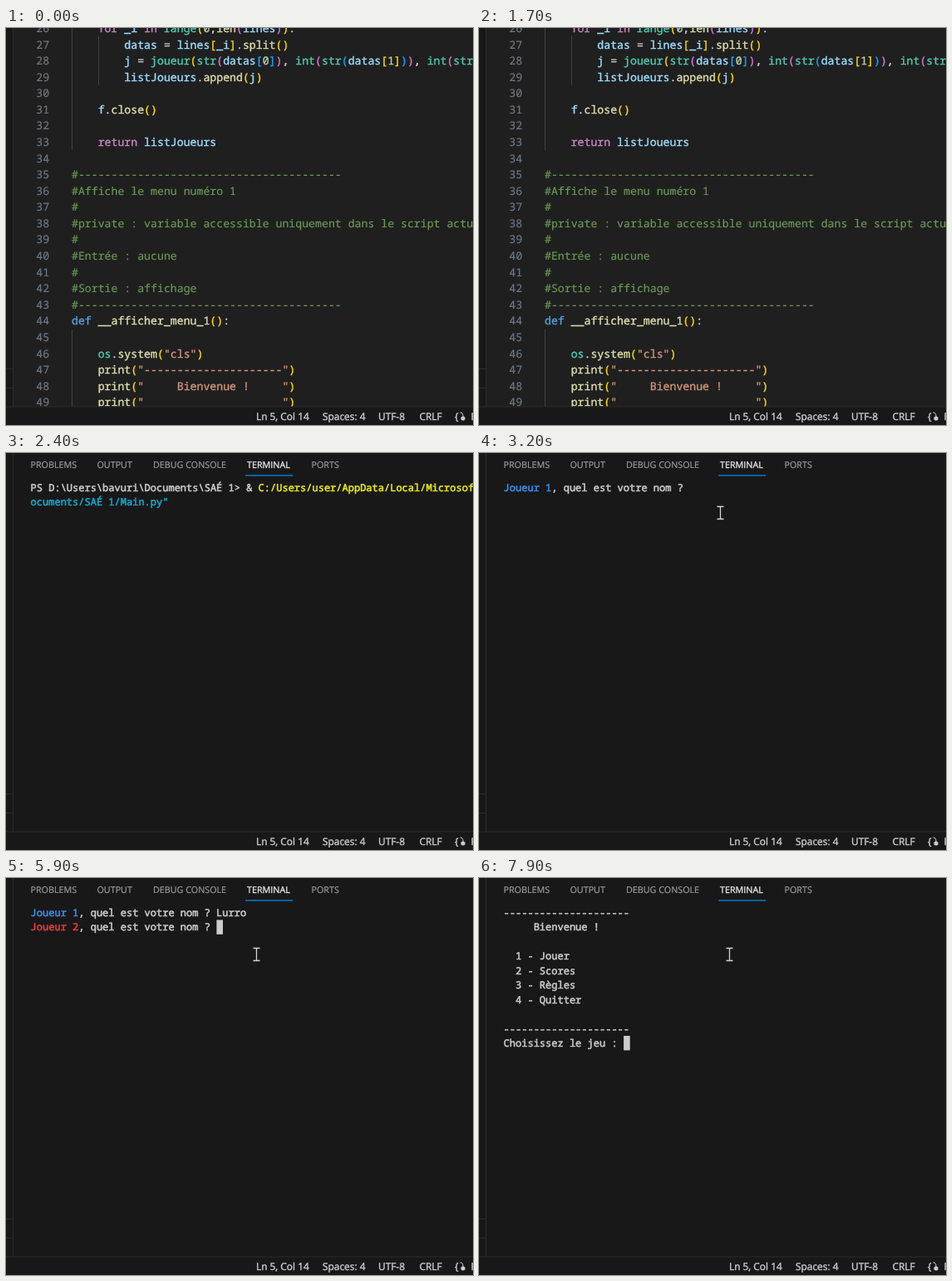
An HTML page with a canvas for the animation above (8 s loop, 562 by 478 pixels).

```html
<!DOCTYPE html>
<html lang="fr">
<head>
<meta charset="utf-8">
<title>Menu</title>
<style>
html, body { margin: 0; width: 100%; height: 100%; overflow: hidden; background: #181818; }
canvas { display: block; }
</style>
</head>
<body>
<canvas id="stage" width="562" height="478"></canvas>
<script>
const ctx = document.getElementById('stage').getContext('2d');
const W = 562, H = 478, LOOP = 8000, STEP = 100;
const MONO = '"Noto Sans Mono", "DejaVu Sans Mono", monospace';
const SANS = '"Open Sans", "Noto Sans", sans-serif';
const GREY = '#cccccc';

// Monospace grids: origin, cell width, first baseline, row pitch, font size, extra stem width
const EDITOR = { x: 79, cw: 7.92, y: 5, pitch: 19.575, size: 13.2, heavy: 0.4 };
const TERM = { x: 29.6, cw: 7.21, y: 46, pitch: 17.45, size: 12.02, heavy: 0.55 };

const FIRST_LINE = 26;
const RULE = '-'.repeat(21);
const CODE = [
  '    for _i in range(0,len(lines)):',
  '        datas = lines[_i].split()',
  '        j = joueur(str(datas[0]), int(str(datas[1])), int(str(datas[2])))',
  '        listJoueurs.append(j)',
  '',
  '    f.close()',
  '',
  '    return listJoueurs',
  '',
  '#' + '-'.repeat(40),
  '#Affiche le menu numéro 1',
  '#',
  '#private : variable accessible uniquement dans le script actuel',
  '#',
  '#Entrée : aucune',
  '#',
  '#Sortie : affichage',
  '#' + '-'.repeat(40),
  'def __afficher_menu_1():',
  '',
  '    os.system("cls")',
  `    print("${RULE}")`,
  '    print("     Bienvenue !     ")',
  `    print("${' '.repeat(21)}")`
];

const WORDS = {};
const paint = (color, words) => words.split(' ').forEach(w => WORDS[w] = color);
paint('#c586c0', 'for in return');
paint('#569cd6', 'def');
paint('#4ec9b0', 'range joueur str int os');
paint('#dcdcaa', 'len split append close system print __afficher_menu_1');
const BRACKETS = ['#ffd700', '#da70d6', '#179fff'];

function highlight(line) {
  let depth = 0;
  return line.match(/#.*|"[^"]*"|\w+|\s+|./g)?.map(s => {
    let color = '#d4d4d4';
    if (s[0] === '#') color = '#6a9955';
    else if (s[0] === '"') color = '#ce9178';
    else if (/^\d/.test(s)) color = '#b5cea8';
    else if (/^\w/.test(s)) color = WORDS[s] || '#9cdcfe';
    else if (/[(\[]/.test(s)) color = BRACKETS[depth++ % 3];
    else if (/[)\]]/.test(s)) color = BRACKETS[--depth % 3];
    return [s, color];
  }) || [];
}
const TOKENS = CODE.map(highlight);

function rect(x, y, w, h, color) {
  ctx.fillStyle = color;
  ctx.fillRect(x, y, w, h);
}

// Text with its stems thickened by a thin outline
function ink(s, x, y, color, heavy) {
  ctx.fillStyle = ctx.strokeStyle = color;
  ctx.lineWidth = heavy;
  ctx.fillText(s, x, y);
  ctx.strokeText(s, x, y);
}

function label(s, x, y, size, color, heavy) {
  ctx.font = `${size}px ${SANS}`;
  ink(s, x, y, color, heavy);
}

function cells(grid, row, col, s, color, heavy = grid.heavy) {
  ctx.font = `${heavy < 0.3 ? 400 : 500} ${grid.size}px ${MONO}`;
  [...s].forEach((c, i) => {
    if (c !== ' ') ink(c, grid.x + (col + i) * grid.cw, grid.y + row * grid.pitch, color, heavy);
  });
}

function runs(grid, row, list) {
  let col = 0;
  for (const [s, color] of list) {
    cells(grid, row, col, s, color, s[0] === '#' ? 0.2 : grid.heavy);
    col += s.length;
  }
}

function editor() {
  rect(9, 0, W - 9, 456, '#1f1f1f');
  rect(79, 0, 1, 147, '#404040');
  rect(111, 10, 1, 59, '#404040');
  rect(79, 363, 1, 93, '#404040');
  TOKENS.forEach((list, row) => {
    cells(EDITOR, row, -5.4, String(FIRST_LINE + row), '#6e7681', 0.2);
    runs(EDITOR, row, list);
  });
}

function tabs() {
  const names = [['PROBLEMS', 29.5], ['OUTPUT', 109.5], ['DEBUG CONSOLE', 177],
    ['TERMINAL', 290], ['PORTS', 367.5]];
  for (const [name, x] of names) {
    const active = name === 'TERMINAL';
    label(name, x, 18.4, 10.75, active ? '#e7e7e7' : '#9d9d9d', active ? 0.35 : 0.2);
  }
  rect(288, 26.3, 57, 1.5, '#0078d4');
}

function frame() {
  rect(0, 456, W, H - 456, '#181818');
  rect(0, 455.5, W, 1, '#2b2b2b');
  rect(8, 0, 1, 456, '#2b2b2b');
  rect(0, 410, 8, 1, '#2b2b2b');
  rect(0, 433, 8, 1, '#2b2b2b');
  const items = [['Ln 5, Col 14', 301], ['Spaces: 4', 381], ['UTF-8', 448], ['CRLF', 497.5],
    ['{', 540], ['Python', 559.5]];
  for (const [s, x] of items) label(s, x, 472, 11.9, GREY, 0.4);
  ctx.beginPath();
  ctx.arc(550, 470, 2.6, 0, 7);
  ctx.fill();
  ctx.lineWidth = 1;
  ctx.beginPath();
  ctx.moveTo(546.5, 463);
  ctx.quadraticCurveTo(550, 462.5, 550, 468);
  ctx.stroke();
}

function block(row, col) {
  rect(TERM.x + col * TERM.cw + 0.3, 33 + row * TERM.pitch, 7.6, 17.4, GREY);
}

const PLAYERS = [
  { name: 'Lurro', color: '#3b8eea', keys: [4300, 4400, 4600, 4800, 5600] },
  { name: 'Dorvel', color: '#e83c3c', keys: [6600, 6700, 6900, 7000, 7100, 7200] }
];
const QUESTION = ', quel est votre nom ? ';

// Draws one question with what has been typed; returns the cursor column
function ask(row, t) {
  const { name, color, keys } = PLAYERS[row];
  const typed = name.slice(0, keys.filter(k => k <= t).length);
  const who = `Joueur ${row + 1}`;
  runs(TERM, row, [[who, color], [QUESTION + typed, GREY]]);
  return who.length + QUESTION.length + typed.length;
}

const MENU = [RULE, '     Bienvenue !', '', '  1 - Jouer', '  2 - Scores', '  3 - Règles',
  '  4 - Quitter', '', RULE, 'Choisissez le jeu : '];

function terminal(t) {
  tabs();
  if (t < 2500) {
    if (t >= 2100) cells(TERM, 0, 0, 'PS D:\\Users\\bavuri\\Documents\\SAÉ 1>', GREY);
    if (t >= 2400) {
      cells(TERM, 0, 36, '&', GREY);
      cells(TERM, 0, 38, 'C:/Users/user/AppData/Local/Microsoft', '#ebeb14');
      cells(TERM, 1, 0, 'ocuments/SAÉ 1/Main.py"', '#11a8cd');
    }
  } else if (t < 7800) {
    const first = ask(0, t);
    if (t >= 5900) block(1, ask(1, t));
    else if (t >= 4200) block(0, first);
  } else {
    MENU.forEach((s, row) => cells(TERM, row, 0, s, GREY));
    block(9, 20);
  }
}

// Pointer: time, x, y
const PATH = [[3000, 272, 36], [3200, 290, 72], [3400, 301, 91], [3600, 301, 92]];

function pointer(t) {
  if (t < PATH[0][0]) return;
  let [, x, y] = PATH[PATH.length - 1];
  const i = PATH.findIndex(p => p[0] > t);
  if (i > 0) {
    const [t0, x0, y0] = PATH[i - 1], [t1, x1, y1] = PATH[i];
    const k = (t - t0) / (t1 - t0);
    x = Math.round(x0 + (x1 - x0) * k);
    y = Math.round(y0 + (y1 - y0) * k);
  }
  ctx.lineWidth = 1.3;
  ctx.strokeStyle = '#d4d4d4';
  ctx.beginPath();
  for (const dy of [-7.5, 7.5]) {
    ctx.moveTo(x - 3.5, y + dy);
    ctx.lineTo(x + 4.5, y + dy);
  }
  ctx.moveTo(x + 0.5, y - 7.5);
  ctx.lineTo(x + 0.5, y + 7.5);
  ctx.stroke();
}

function draw(now) {
  const t = Math.floor((now % LOOP) / STEP) * STEP;
  ctx.textRendering = 'geometricPrecision';
  ctx.lineJoin = 'round';
  rect(0, 0, W, H, '#181818');
  if (t < 1800) editor();
  else terminal(t);
  frame();
  pointer(t);
}

let start;
function tick(now) {
  start ??= now;
  draw(now - start);
  requestAnimationFrame(tick);
}
draw(0);
requestAnimationFrame(tick);
</script>
</body>
</html>
```
